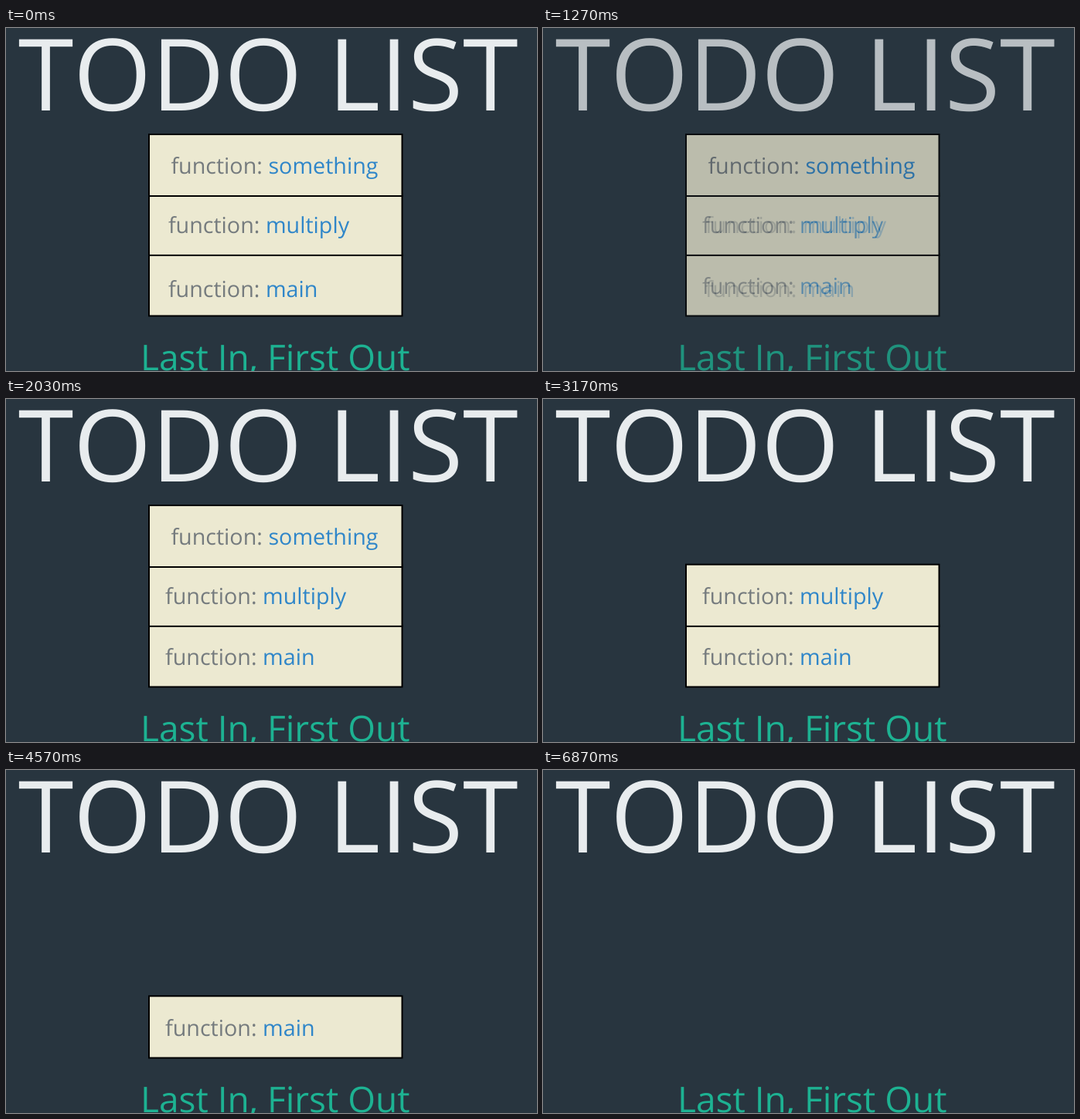
Write an HTML page that moves like this. It is 687x445 px and loops after 7.03 s.

```html
<!DOCTYPE html>
<html lang="en">
<head>
<meta charset="utf-8">
<title>Todo list</title>
<style>
  html, body { margin: 0; width: 100%; height: 100%; overflow: hidden; background: #28353f; }
  svg { display: block; width: 687px; height: 445px; }
  text { font-family: "Open Sans", "Noto Sans", sans-serif; font-kerning: none; text-rendering: geometricPrecision; white-space: pre; }
  .title { font-size: 129.4px; fill: #e8ecee; }
  .caption { font-size: 46px; fill: #1db292; }
  .label { font-size: 28.7px; fill: #757b7e; }
  .name { fill: #2f86c9; }
  rect { fill: #ece9d1; stroke: #000; stroke-width: 2; }
</style>
</head>
<body>
<svg id="stage" viewBox="0 0 687 445"></svg>
<script>
const LOOP = 7030;
const FADE = 200;
const DISSOLVE = { start: 1040, end: 1500 };
const stage = document.getElementById('stage');

function add(parent, tag, attrs, content) {
  const node = document.createElementNS('http://www.w3.org/2000/svg', tag);
  for (const key in attrs) node.setAttribute(key, attrs[key]);
  if (content) node.textContent = content;
  parent.appendChild(node);
  return node;
}

function addCard(parent, name, top, height, x, baseline) {
  const card = add(parent, 'g', {});
  add(card, 'rect', { x: 185, y: top, width: 327.5, height });
  const label = add(card, 'text', { class: 'label', x, y: baseline }, 'function: ');
  add(label, 'tspan', { class: 'name' }, name);
  return card;
}

// Cards are stacked from the bottom, each covering the top edge of the one below.
function addSlide(x, mainBaseline) {
  const group = add(stage, 'g', {});
  add(group, 'text', { class: 'title', x: 15.8, y: 106.6 }, 'TODO LIST');
  add(group, 'text', { class: 'caption', x: 174.1, y: 443.5 }, 'Last In, First Out');
  const main = addCard(group, 'main', 293.3, 80.2, x, mainBaseline);
  const multiply = addCard(group, 'multiply', 214.7, 80.2, x, 266.2);
  const something = addCard(group, 'something', 138, 80, 213.4, 189.2);
  return { group, main, multiply, something };
}

const before = addSlide(209.9, 348.9);
const after = addSlide(206, 344.5);
const exits = [
  [after.something, 2640],
  [after.multiply, 3640],
  [after.main, 4840]
];

function progress(t, start, end) {
  return Math.min(1, Math.max(0, (t - start) / (end - start)));
}

function draw(t) {
  const p = progress(t, DISSOLVE.start, DISSOLVE.end);
  before.group.setAttribute('opacity', 1 - p);
  after.group.setAttribute('opacity', p);
  for (const [card, start] of exits) {
    card.setAttribute('opacity', 1 - progress(t, start, start + FADE));
  }
}

const origin = performance.now();
function tick() {
  draw((performance.now() - origin) % LOOP);
  requestAnimationFrame(tick);
}
draw(0);
requestAnimationFrame(tick);
</script>
</body>
</html>
```
